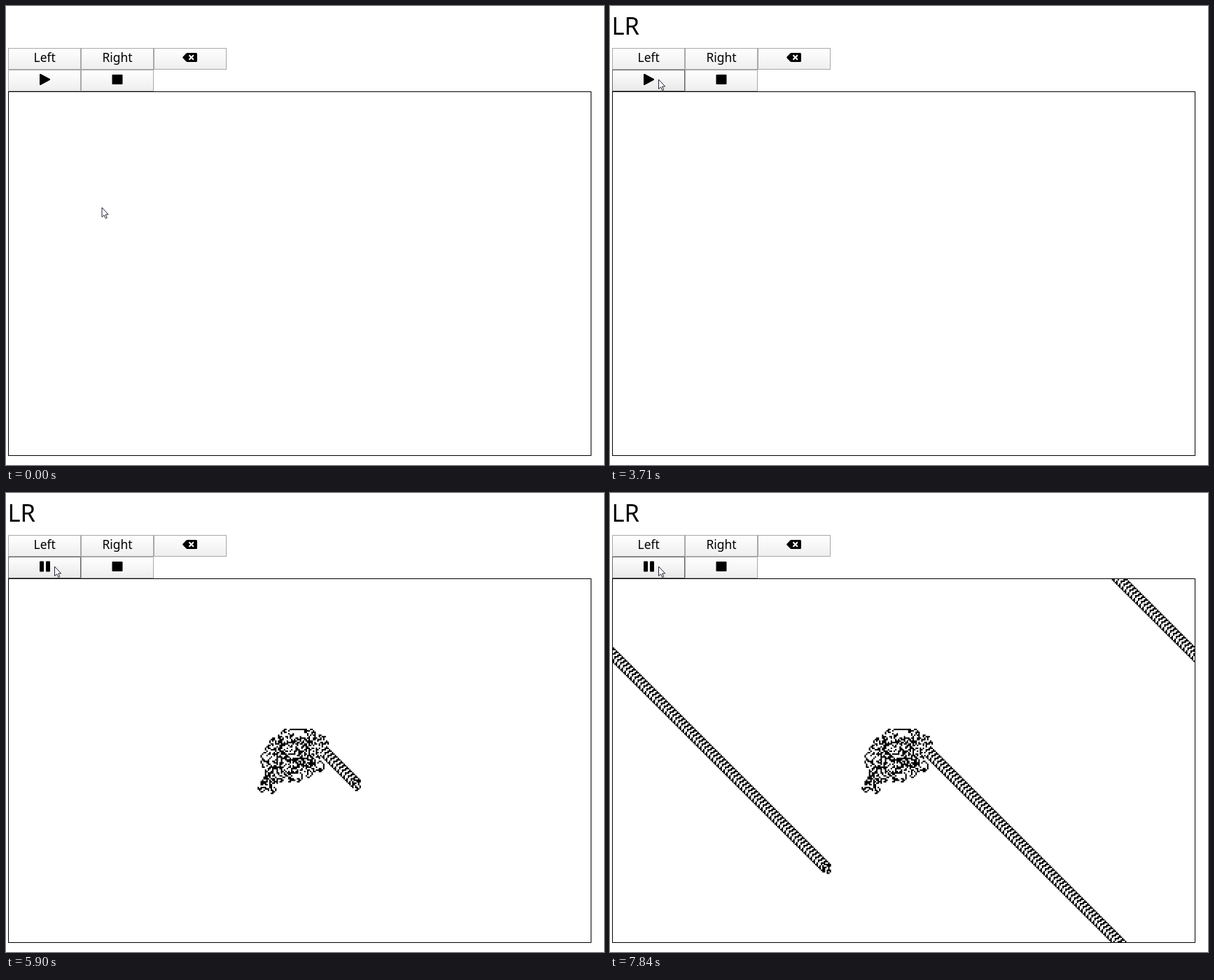
Write an HTML page with a canvas that moves like this. It is 854x656 px and loops after 7.99 s.

```html
<!DOCTYPE html>
<html lang="en">
<head>
<meta charset="utf-8">
<title>LR ant</title>
<style>
html, body { margin: 0; width: 100%; height: 100%; overflow: hidden; background: #fff; }
svg, canvas { position: absolute; left: 0; top: 0; }
#field { left: 4px; top: 123px; width: 831px; height: 519px; }
text { font-family: "Noto Sans", "Open Sans", sans-serif; font-size: 17.4px; fill: #000; }
#word { font-size: 34.5px; }
.key { fill: url(#plain); stroke: #a8a8a8; }
.key.hover { fill: url(#over); stroke: #666; }
.key.down { fill: url(#press); stroke: #555; }
</style>
</head>
<body>
<canvas id="field" width="800" height="500"></canvas>
<svg width="854" height="656" viewBox="0 0 854 656">
  <defs>
    <linearGradient id="plain" x2="0" y2="1"><stop stop-color="#fff"/><stop offset="1" stop-color="#eee"/></linearGradient>
    <linearGradient id="over" x2="0" y2="1"><stop stop-color="#fff"/><stop offset="1" stop-color="#e8e8e8"/></linearGradient>
    <linearGradient id="press" x2="0" y2="1"><stop stop-color="#e2e2e2"/><stop offset="1" stop-color="#f4f4f4"/></linearGradient>
  </defs>
  <text id="word" x="2.5" y="41"></text>
  <g id="keys"></g>
  <text x="55.2" y="80" text-anchor="middle">Left</text>
  <text x="159" y="80" text-anchor="middle">Right</text>
  <path d="M259 67H271.5Q273 67 273 68.5V78.5Q273 80 271.5 80H259Q258 80 257 79L252.5 74.3Q252 73.5 252.5 72.7L257 68Q258 67 259 67Z"/>
  <path d="M261.5 70.2L267.9 76.8M267.9 70.2L261.5 76.8" stroke="#fff" stroke-width="2"/>
  <path id="play" d="M49 98L62 105L49 112Z" stroke="#000" stroke-width="2" stroke-linejoin="round"/>
  <path id="pause" d="M49 98.5H53V111.5H49ZM58 98.5H62V111.5H58Z" stroke="#000" stroke-width="2" stroke-linejoin="round"/>
  <rect x="151.5" y="98" width="15" height="14" rx="1"/>
  <rect x="3.5" y="122.5" width="832" height="520" fill="none" stroke="#000"/>
  <path id="cursor" d="M0 0V13.6L3.1 10.8L5.3 15.6L7.3 14.7L5.2 10H9.2Z" fill="#fff" stroke="#223" stroke-width="1"/>
</svg>
<script>
const LOOP = 7990, COLS = 400, ROWS = 250, CELL = 2, BATCH = 800;
const $ = id => document.getElementById(id);

// --- buttons ---
const boxes = [[3, 60], [107, 60], [211, 60], [3, 91], [107, 91]];
const keys = boxes.map(([x, y]) => {
  const r = document.createElementNS("http://www.w3.org/2000/svg", "rect");
  const size = { x: x + .5, y: y + .5, width: 103, height: 30 };
  for (const k in size) r.setAttribute(k, size[k]);
  return $("keys").appendChild(r);
});

// --- timed steps: [first, last, count] ---
const passed = (t, [from, to, n]) =>
  t < from ? 0 : n < 2 ? 1 : Math.min(n, 1 + Math.floor((t - from + 4) * (n - 1) / (to - from)));

const moves = [
  { when: [760, 1130, 6], to: [64, 46] },
  { when: [1530, 1680, 3], to: [58.5, 66] },
  { when: [2390, 2690, 5], to: [164, 68] },
  { when: [3410, 3710, 5], to: [69.5, 105] }
];
const presses = [[1990, 2160, 0], [3010, 3180, 1], [4260, 4340, 3]];
const batches = [
  [4570, 4570, 1], [4720, 4950, 4], [5120, 5270, 3], [5420, 5670, 4],
  [5820, 6040, 4], [6190, 6350, 3], [6500, 6730, 4], [6900, 7050, 3],
  [7210, 7440, 4], [7610, 7840, 4]
];

function cursorAt(t) {
  let p = [137, 288];
  for (const { when, to } of moves) {
    const u = passed(t, when) / when[2], e = u * u * (3 - 2 * u);
    p = p.map((v, i) => v + (to[i] - v) * e);
  }
  return p;
}

// --- the ant: turn one way on white, the other on black ---
const DX = [0, 1, 0, -1], DY = [-1, 0, 1, 0];

function makeAnt(heading, turn) {
  const cells = new Uint8Array(COLS * ROWS);
  const ant = { cells, x: COLS / 2, y: ROWS / 2, steps: 0, left: COLS, top: ROWS };
  ant.run = total => {
    for (; ant.steps < total; ant.steps++) {
      const i = ant.y * COLS + ant.x;
      heading = (heading + (cells[i] ? 4 - turn : turn)) % 4;
      cells[i] ^= 1;
      ant.x = (ant.x + DX[heading] + COLS) % COLS;
      ant.y = (ant.y + DY[heading] + ROWS) % ROWS;
      ant.left = Math.min(ant.left, ant.x);
      ant.top = Math.min(ant.top, ant.y);
    }
    return ant;
  };
  return ant;
}

// Pick the start whose trail leaves to the lower right of a wide blot.
function findStart() {
  for (const turn of [3, 1])
    for (let h = 0; h < 4; h++) {
      const a = makeAnt(h, turn).run(11200);
      const wide = COLS / 2 - a.left > ROWS / 2 - a.top;
      if (a.x > COLS / 2 && a.y > ROWS / 2 && wide) return [h, turn];
    }
  return [0, 3];
}

const start = findStart(), ctx = $("field").getContext("2d");
let ant = makeAnt(...start), drawn = -1;

function drawField(steps) {
  if (steps === drawn) return;
  if (steps < ant.steps) ant = makeAnt(...start);
  ant.run(steps);
  drawn = steps;
  ctx.clearRect(0, 0, COLS * CELL, ROWS * CELL);
  ant.cells.forEach((on, i) => {
    if (on) ctx.fillRect(i % COLS * CELL, Math.floor(i / COLS) * CELL, CELL, CELL);
  });
}

function render(t) {
  const [x, y] = cursorAt(t);
  $("cursor").setAttribute("transform", `translate(${x} ${y})`);
  const held = presses.find(([a, b]) => t >= a && t < b);
  keys.forEach((key, i) => {
    const [bx, by] = boxes[i];
    const over = x >= bx && x < bx + 104 && y >= by && y < by + 31;
    key.setAttribute("class", "key" + (held && held[2] === i ? " down" : over ? " hover" : ""));
  });
  $("word").textContent = t < 2160 ? "" : t < 3180 ? "L" : "LR";
  const running = t >= 4340;
  $("play").style.display = running ? "none" : "";
  $("pause").style.display = running ? "" : "none";
  drawField(BATCH * batches.reduce((n, b) => n + passed(t, b), 0));
}

const begin = performance.now();
function frame() {
  render((performance.now() - begin) % LOOP);
  requestAnimationFrame(frame);
}
frame();
</script>
</body>
</html>
```
